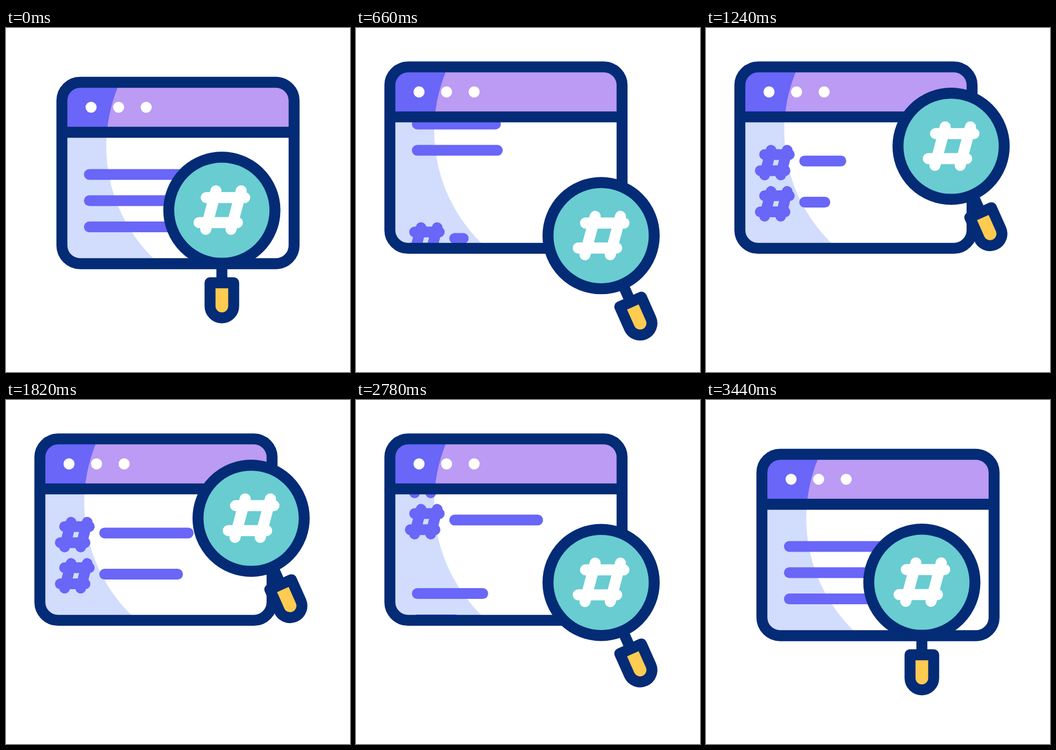
These frames come from a looping animation (640x640 px, 3600 ms). An HTML page:

```html
<!DOCTYPE html>
<html lang="en">
<head>
<meta charset="utf-8">
<title>Hashtag search</title>
<style>
  html, body { margin: 0; width: 100%; height: 100%; overflow: hidden; background: #fff; }
  svg { display: block; width: 100vw; height: 100vh; }
  .ink { fill: none; stroke: #042b76; stroke-width: 20.4; stroke-linejoin: round; }
  .bar { fill: none; stroke: #6966f8; stroke-width: 20; stroke-linecap: round; }
  .white { stroke: #fff; stroke-width: 20.6; }
</style>
</head>
<body>
<svg viewBox="0 0 640 640">
  <defs>
    <clipPath id="inside"><rect x="104" y="101" width="432" height="337.5" rx="34"/></clipPath>
    <clipPath id="page"><rect x="104" y="194" width="432" height="244.5" rx="0"/></clipPath>
  </defs>
  <g id="win">
    <g clip-path="url(#inside)">
      <path fill="#d2dcfc" d="M94 194h452v260H94z"/>
      <path fill="#6966f8" d="M94 91h452v103H94z"/>
      <clipPath id="lit"><circle cx="478.5" cy="220" r="292"/></clipPath>
      <g clip-path="url(#lit)">
        <path fill="#fff" d="M94 194h452v260H94z"/>
        <path fill="#bb9bf3" d="M94 91h452v103H94z"/>
      </g>
      <g clip-path="url(#page)">
        <g id="lines"></g>
        <g id="tags"></g>
      </g>
    </g>
    <g fill="#fff">
      <circle cx="158.3" cy="147.5" r="10.3"/>
      <circle cx="209.5" cy="147.5" r="10.3"/>
      <circle cx="260.8" cy="147.5" r="10.3"/>
    </g>
    <rect class="ink" x="104" y="101" width="432" height="337.5" rx="34"/>
    <path class="ink" d="M104 194H536" stroke-linecap="round"/>
  </g>
  <g id="lens">
    <g id="handle">
      <path class="ink" d="M0 100V135"/>
      <path class="ink" style="fill:#ffcb50" d="M-22 135H22V178.3A22 22 0 0 1-22 178.3Z"/>
    </g>
    <circle class="ink" style="fill:#68ccd1" r="98.8"/>
    <path class="bar white" d="M-29 -23.5H42.5M-42.5 23H29M-11 -36L-30 35.5M36 -36L17 35.5"/>
  </g>
</svg>
<script>
const LOOP = 3600;
const $ = id => document.getElementById(id);

// Eased progress from time a to time b
const ease = (t, a, b) => {
  const s = Math.min(1, Math.max(0, (t - a) / (b - a)));
  return s * s * (3 - 2 * s);
};
const move = (el, x, y) => el.setAttribute('transform', `translate(${x} ${y})`);
const addBar = (parent, d) => {
  const p = document.createElementNS('http://www.w3.org/2000/svg', 'path');
  p.setAttribute('class', 'bar');
  if (d) p.setAttribute('d', d);
  parent.append(p);
  return p;
};
const setBar = (bar, x, y, length) => bar.setAttribute('d', `M${x} ${y}h${length}`);

const lines = [171, 145.5, 149].map((length, i) =>
  ({ bar: addBar($('lines')), y: 272.5 + 48.8 * i, length, grow: [2400 + 100 * i, 3000 + 100 * i] }));

const tags = [
  { y: 276, length: 155.5, grow: [990, 1600] },
  { y: 352.7, length: 154.5, grow: [960, 2080] }
].map(tag => {
  const y = tag.y;
  addBar($('tags'), `M150 ${y - 12}h46M142 ${y + 18}h46` +
    `M162 ${y - 20}l-12 46M192 ${y - 20}l-12 46`);
  return { ...tag, bar: addBar($('tags')) };
});

function draw(t) {
  const shift = ease(t, 200, 600) - ease(t, 3000, 3400);
  const lift = ease(t, 600, 1200) - ease(t, 2400, 3000);
  const scrollIn = ease(t, 200, 1200);
  const scrollOut = ease(t, 2400, 3200);
  const back = t >= 2400;

  move($('win'), -41 * shift, -28.6 * shift);

  // The lens swings out along a slightly bowed path
  const bow = shift * (1 - shift);
  move($('lens'), 401.6 + 54.4 * shift - 3 * bow, 339 + 52.3 * shift - 16 * bow - 171.3 * lift);
  $('handle').setAttribute('transform', `rotate(${-24 * shift})`);

  move($('lines'), 0, back ? 217 * (1 - scrollOut) : -258 * scrollIn);
  for (const { bar, y, length, grow } of lines)
    setBar(bar, 155, y, length * (back ? 0.05 + 0.95 * ease(t, ...grow) : 1));

  move($('tags'), 0, 258 * (1 - scrollIn) - 217 * scrollOut);
  for (const { bar, y, length, grow } of tags)
    setBar(bar, 224.5, y, length * (0.103 + 0.897 * ease(t, ...grow)));
}

function tick() {
  draw(performance.now() % LOOP);
  requestAnimationFrame(tick);
}
tick();
</script>
</body>
</html>
```
